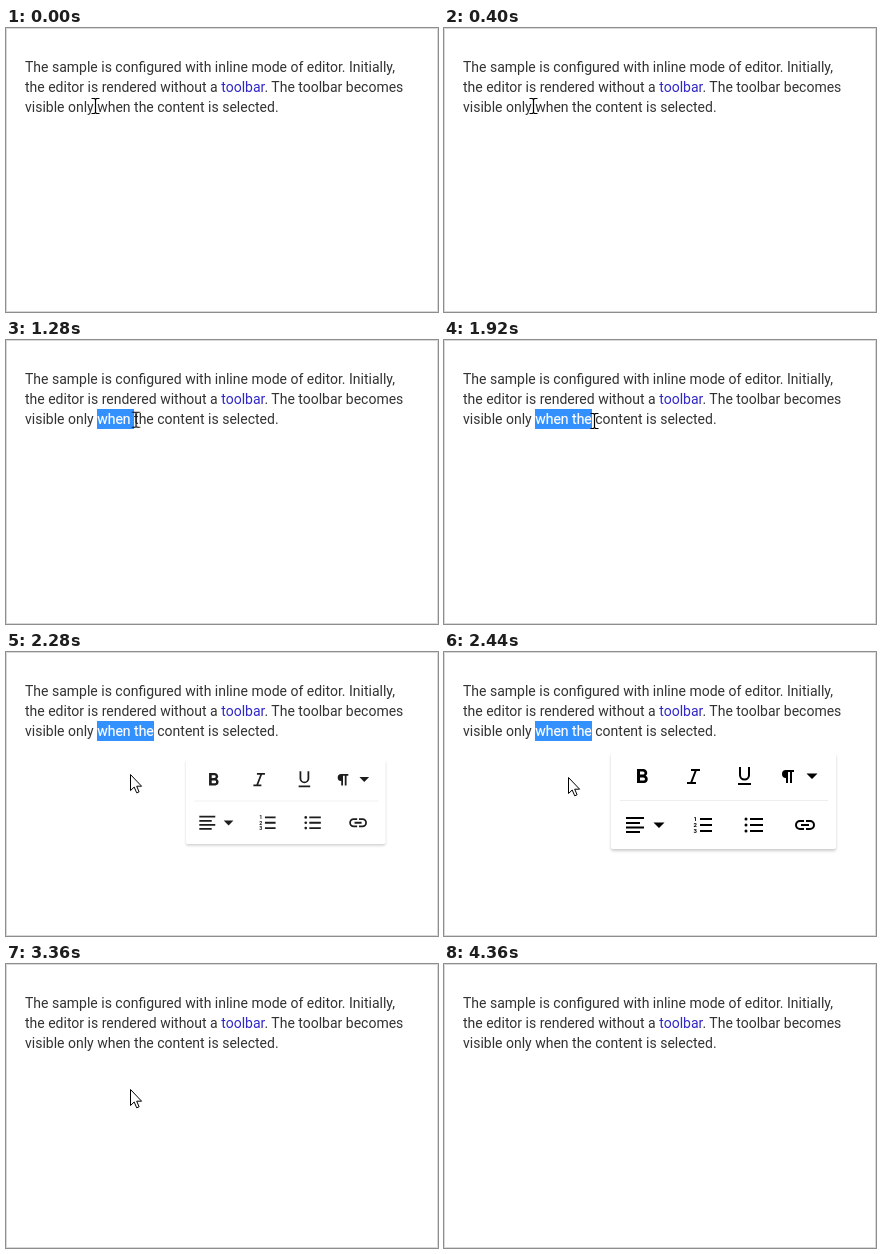
These frames come from a looping animation (432x284 px, 4600 ms). An HTML page:

```html
<!DOCTYPE html>
<html lang="en">
<head>
<meta charset="utf-8">
<title>Inline editor toolbar</title>
<style>
  html, body { margin: 0; width: 100%; height: 100%; overflow: hidden; background: #fff; }
  .stage {
    position: relative; box-sizing: border-box; width: 432px; height: 284px;
    overflow: hidden; border: 1px solid #d8d8d8;
    font: 14px/20px Roboto, Arial, sans-serif; color: #333;
  }
  .stage > * { position: absolute; animation: 4.6s linear infinite; }
  p { left: 18px; top: 28px; margin: 0; white-space: pre; }
  a { color: #3028c8; }

  .pick { position: relative; }
  .mark {
    position: absolute; left: 0; top: -2px; height: 20px; line-height: 20px;
    padding-top: 0; width: 0; overflow: hidden;
    background: #3390ff; color: #fff; -webkit-text-stroke: .2px #fff;
    animation: select 4.6s step-end infinite;
  }

  .popup {
    left: 166px; top: 100px; width: 225px; height: 96px;
    background: #fff; border-radius: 2px;
    box-shadow: 0 2px 3px rgba(0, 0, 0, .2);
    transform-origin: 115px 52px; animation-name: zoom;
  }
  .popup svg { display: block; }
  .line { fill: none; stroke: #000; stroke-width: 2; }
  .num { font: bold 6px Roboto, Arial, sans-serif; }

  .cursor { left: -1px; top: -1px; overflow: visible; }
  .beam { animation-name: beam; }
  .arrow { animation-name: arrow; }

  /* the selection snaps to whole letters */
  @keyframes select {
    0% { width: 0; }
    16.96% { width: .75em; }
    20.74% { width: 1.3em; }
    22.96% { width: 1.83em; }
    25.24% { width: 2.38em; }
    26.9% { width: 2.63em; }
    28% { width: 2.96em; }
    29.9% { width: 3.51em; }
    32.1% { width: 4.04em; }
    73.02%, 100% { width: 0; }
  }
  @keyframes zoom {
    0%, 44.35% { transform: scale(0); opacity: 0; animation-timing-function: ease; }
    53.04%, 73.02% { transform: none; opacity: 1; }
    73.03%, 100% { transform: scale(0); opacity: 0; }
  }
  @keyframes beam {
    0%, 13.91% { transform: translate(89px, 78px); opacity: 1; }
    20% { transform: translate(103px, 78px); }
    33.91%, 42.6% { transform: translate(150px, 81px); }
    44.34% { transform: translate(144px, 92px); opacity: 1; }
    44.35%, 100% { transform: translate(144px, 92px); opacity: 0; }
  }
  @keyframes arrow {
    0%, 44.34% { transform: translate(142px, 96px); opacity: 0; }
    44.35% { transform: translate(142px, 96px); opacity: 1; animation-timing-function: ease-out; }
    49.56% { transform: translate(124px, 122px); }
    52.17%, 80.87% { transform: translate(124px, 125px); animation-timing-function: ease-in; }
    83.48%, 84.32% { transform: translate(124px, 181px); opacity: 1; }
    84.33%, 100% { transform: translate(124px, 181px); opacity: 0; }
  }
</style>
</head>
<body>
<div class="stage">
  <p>The sample is configured with inline mode of editor. Initially,
the editor is rendered without a <a>toolbar</a>. The toolbar becomes
visible only <span class="pick">when the<span class="mark" aria-hidden="true">when the</span></span> content is selected.</p>

  <div class="popup">
    <svg width="225" height="96" viewBox="167 101 225 96">
      <path d="M176 148.5H384" stroke="#eee"/>
      <!-- bold, italic, underline, paragraph -->
      <path transform="translate(186 113)" d="M15.6 10.79c.97-.67 1.65-1.77 1.65-2.79 0-2.26-1.75-4-4-4H7v14h7.04c2.09 0 3.71-1.7 3.71-3.79 0-1.52-.86-2.82-2.15-3.42zM10 6.5h3a1.5 1.5 0 0 1 0 3h-3zM13.5 15.5H10v-3h3.5a1.5 1.5 0 0 1 0 3z"/>
      <path class="line" d="M247 118h9M243 131h9M252 118L247 131"/>
      <path class="line" d="M296 115v8a4.5 4.5 0 0 0 9 0v-8M294 132h13"/>
      <path transform="translate(333 116)" d="M9 10v5h2V4h2v11h2V4h2V2H9a4 4 0 0 0 0 8z"/>
      <path d="M362.5 121.5h11l-5.5 5.5zM209.5 170.5h11l-5.5 5.5z"/>
      <!-- alignment, lists, link -->
      <path class="line" d="M182 166h18M182 171h14M182 175.5h18M182 180h14"/>
      <path class="line" d="M256 167h12M256 173h12M256 179h12M306 167h13M306 173h13M306 179h13"/>
      <g class="num">
        <text x="249.5" y="169">1</text>
        <text x="249.5" y="175">2</text>
        <text x="249.5" y="181">3</text>
      </g>
      <circle cx="302" cy="167" r="1.5"/>
      <circle cx="302" cy="173" r="1.5"/>
      <circle cx="302" cy="179" r="1.5"/>
      <path class="line" d="M360 169h-4a4 4 0 0 0 0 8h4M362 169h4a4 4 0 0 1 0 8h-4M357 173h8"/>
    </svg>
  </div>

  <svg class="cursor beam" width="1" height="1">
    <path d="M-3.5-7.5h3l1 1 1-1h3M-3.5 7.5h3l1-1 1 1h3M.5-6.5v13" fill="none" stroke="#000" stroke-width="1.2"/>
  </svg>
  <svg class="cursor arrow" width="1" height="1">
    <path d="M.5.5v16l3.7-3.5 2.5 5.8 2.4-1-2.4-5.6h4.9z" fill="#fff" stroke="#000"/>
  </svg>
</div>
</body>
</html>
```
